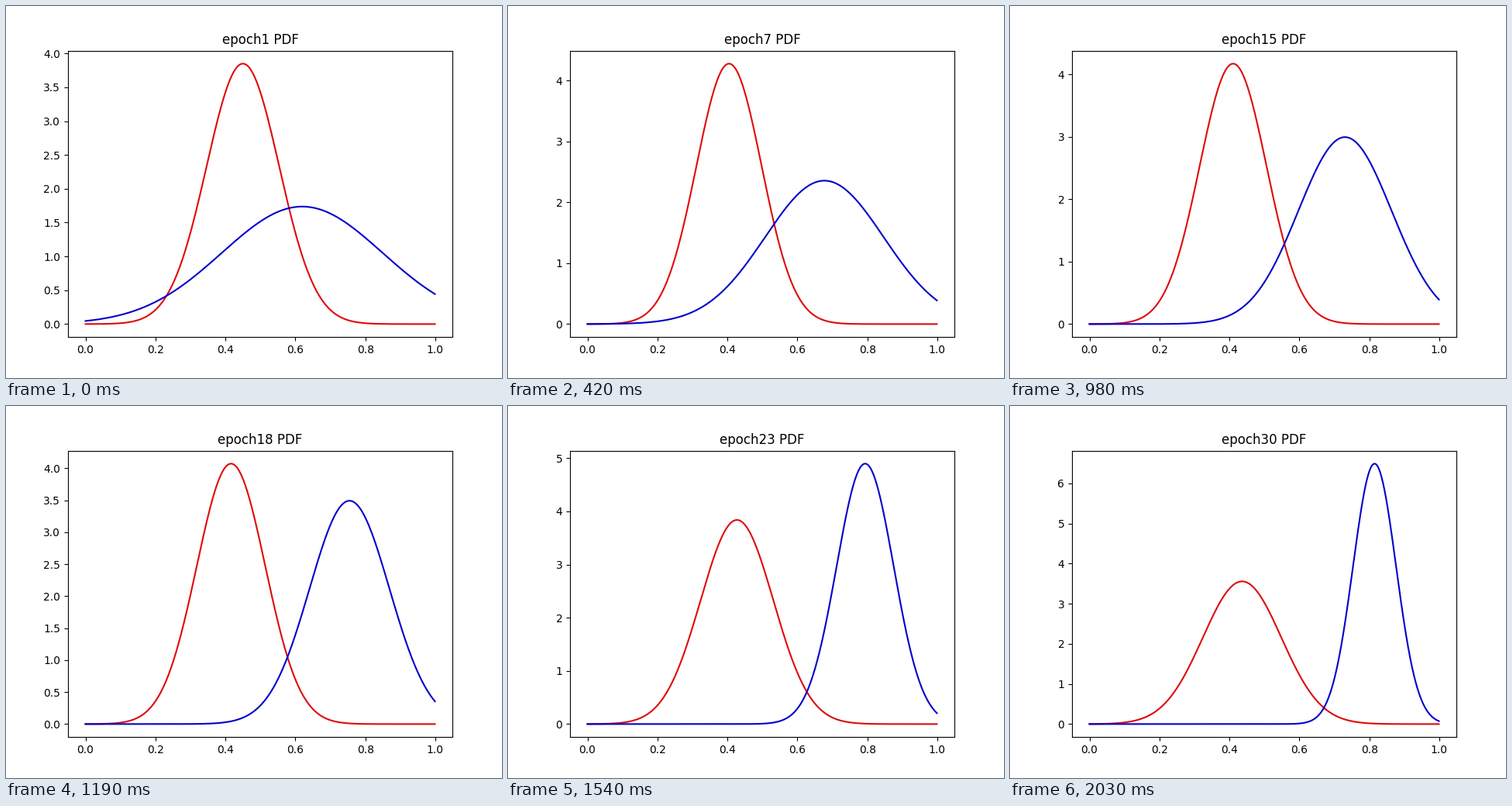
Write a matplotlib script that moves like this. It is 640 px wide and 480 px high and loops after 2.1 s.

```python
import numpy as np
import matplotlib.pyplot as plt
from matplotlib.animation import FuncAnimation

EPOCHS = 30
INTERVAL = 70


def drift(epoch, base, kick, decay, gain, mid, width):
    """Early kick that dies out, then a slow start and a quick saturation."""
    ease = 1 - np.exp(-np.exp((epoch - mid) / width))
    return base + kick * decay ** (epoch - 1) + gain * ease


def red_params(epoch):
    mu = drift(epoch, 0.3989, 0.0498, 0.6, 0.0378, 21, 6)
    sigma = drift(epoch, 0.0918, 0.0115, 0.6, 0.0215, 24, 5.5)
    return mu, sigma


def blue_params(epoch):
    mu = drift(epoch, 0.6716, -0.061, 0.8, 0.144, 18.8, 6.5)
    sigma = drift(epoch, 0.1818, 0.0549, 0.66, -0.121, 19.3, 6.5)
    return mu, sigma


def pdf(x, mu, sigma):
    return np.exp(-0.5 * ((x - mu) / sigma) ** 2) / (sigma * np.sqrt(2 * np.pi))


plt.rcParams["text.kerning_factor"] = 6  # classic letter spacing

x = np.arange(0, 1, 0.001)
fig, ax = plt.subplots(figsize=(6.4, 4.8), dpi=100)
red, = ax.plot(x, x, color="#e00808")
blue, = ax.plot(x, x, color="#0000cc")
title = ax.set_title("")


def update(frame):
    epoch = frame + 1
    red.set_ydata(pdf(x, *red_params(epoch)))
    blue.set_ydata(pdf(x, *blue_params(epoch)))
    title.set_text(f"epoch{epoch} PDF")
    ax.relim()
    ax.autoscale_view()
    return red, blue, title


anim = FuncAnimation(fig, update, frames=EPOCHS, interval=INTERVAL,
                     repeat=True, repeat_delay=0, blit=False)
plt.show()
```
